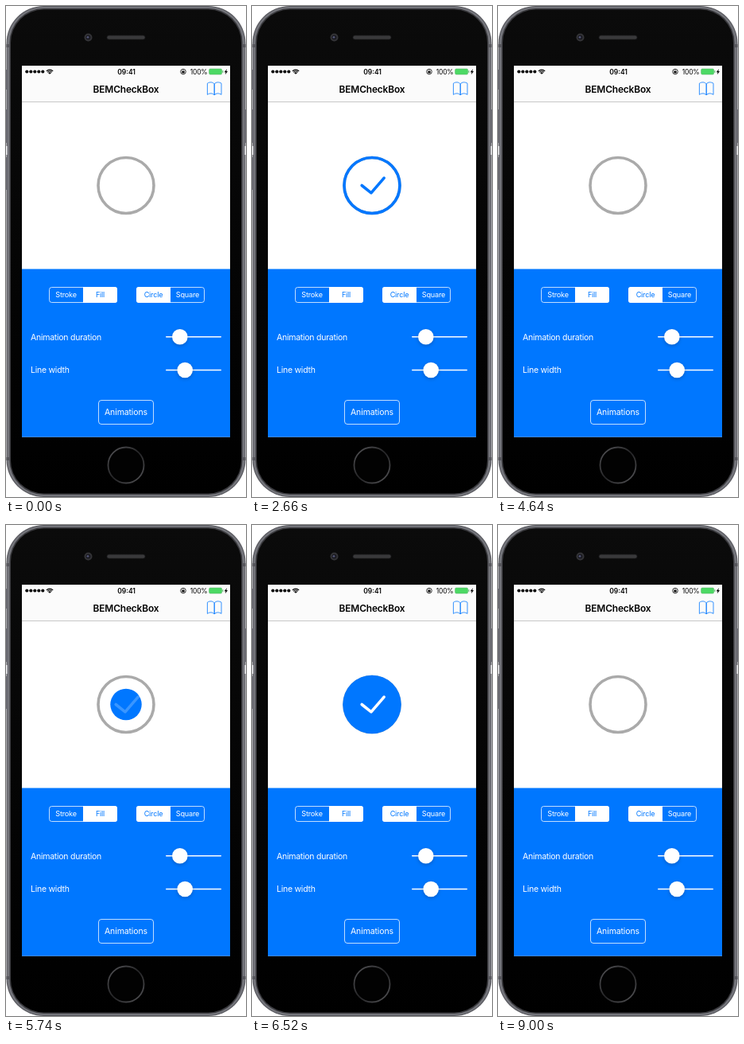
These frames come from a looping animation (302 px wide and 617 px high, 9.42 s). An HTML page with a canvas:

```html
<!DOCTYPE html>
<html lang="en">
<head>
<meta charset="utf-8">
<title>Checkbox demo</title>
<style>
html, body { margin: 0; width: 100%; height: 100%; overflow: hidden; background: #fff; }
canvas { display: block; width: 302px; height: 617px; }
</style>
</head>
<body>
<canvas id="stage"></canvas>
<script>
const W = 302, H = 617, LOOP = 9420, DURATION = 500;
const BLUE = '#0077ff', GREY = '#aaa', WHITE = '#fff';
const START = { strokeOn: 370, strokeOff: 3005, fillOn: 5576, fillOff: 8262 };
const BOX = { x: 151, y: 225.5, size: 70, line: 3.6 };
const SCREEN = { x: 20, y: 75, w: 262, h: 466.6 };

const canvas = document.getElementById('stage');
const ratio = window.devicePixelRatio || 1;
canvas.width = W * ratio;
canvas.height = H * ratio;
const screenCtx = canvas.getContext('2d');
let ctx = screenCtx;

function paint(fill, stroke, width = 1) {
  if (fill) { ctx.fillStyle = fill; ctx.fill(); }
  if (stroke) { ctx.strokeStyle = stroke; ctx.lineWidth = width; ctx.stroke(); }
}
function rect(x, y, w, h, fill) {
  ctx.fillStyle = fill;
  ctx.fillRect(x, y, w, h);
}
function round(x, y, w, h, r, fill, stroke, width) {
  ctx.beginPath();
  ctx.roundRect(x, y, w, h, r);
  paint(fill, stroke, width);
}
function disc(x, y, r, fill, stroke, width) {
  ctx.beginPath();
  ctx.arc(x, y, r, 0, Math.PI * 2);
  paint(fill, stroke, width);
}
function text(str, x, y, size, color, align = 'center', weight = 400, spacing = -0.02) {
  ctx.font = `${weight} ${size}px Inter, "Liberation Sans", sans-serif`;
  ctx.letterSpacing = `${size * spacing}px`;
  ctx.textAlign = align;
  ctx.fillStyle = color;
  ctx.fillText(str, x, y);
}
function gradient(x0, y0, x1, y1, ...colors) {
  const g = ctx.createLinearGradient(x0, y0, x1, y1);
  colors.forEach((c, i) => g.addColorStop(i / (colors.length - 1), c));
  return g;
}

function drawPhone() {
  rect(0, 0, W, H, WHITE);
  round(0.5, 0, 301, 617, 47, '#56565c');
  round(1.5, 1, 299, 615, 46, '#74757b');
  round(4.5, 3, 293, 611, 43, '#3a3a3e');
  round(6, 4.5, 290, 608, 41.5, gradient(0, 0, 0, H, '#0b0b0b', '#050505', '#000'));
  for (const y of [48, 567]) {
    rect(0.5, y, 4, 4, '#56565c');
    rect(297.5, y, 4, 4, '#56565c');
  }
  for (const x of [0, 300.5]) {
    rect(x, 130, 1.5, 42, '#6a6a72');
    rect(x, 176, 1.5, 11, '#f2f2f4');
  }
  rect(0, 80, 1.5, 25, '#6a6a72');
  rect(0, 190, 1.5, 41, '#6a6a72');
  disc(103.5, 39.5, 5, '#343437');
  disc(103.5, 39.5, 3, '#1b1b22');
  disc(103, 39.2, 1.3, '#55587a');
  round(127, 37, 48, 5, 2.5, '#39393b', '#1c1c1d', 0.8);
  disc(151, 577, 22.5, '#020202', gradient(130, 555, 172, 599, '#555558', '#242426', '#555558'), 1.8);
}

function drawStatusBar() {
  for (let i = 0; i < 5; i++) disc(26.3 + i * 5, 82.5, 2.05, '#000');
  ctx.lineCap = 'butt';
  for (const r of [2.3, 4.5, 6.6]) {
    ctx.beginPath();
    ctx.arc(55, 86, r - 0.7, -Math.PI * 0.75, -Math.PI * 0.25);
    paint(null, '#000', r < 3 ? 2 : 1.2);
  }
  text('09:41', 151.5, 85.6, 8.5, '#000', 'center', 600, 0);
  disc(223, 82.5, 3.3, null, '#000', 0.8);
  rect(221.4, 82, 3.2, 2.4, '#000');
  disc(223, 81.8, 1.1, null, '#000', 0.6);
  text('100%', 253.5, 85.6, 8.5, '#000', 'right');
  round(255.6, 79, 16, 7, 1.4, '#4cd964', '#58b868', 0.6);
  rect(272.3, 81.2, 1.1, 2.6, '#58b868');
  ctx.beginPath();
  [[278, 79], [274.7, 83.2], [276.5, 83.2], [275.8, 86.3], [279, 81.9], [277.2, 81.9]]
    .forEach(p => ctx.lineTo(...p));
  paint('#000');
}

function drawBook() {
  ctx.lineJoin = 'round';
  for (const side of [-1, 1]) {
    const x = d => 262.2 + side * d;
    ctx.beginPath();
    ctx.moveTo(x(0), 98);
    ctx.bezierCurveTo(x(2), 95.3, x(6), 95.3, x(8.8), 97.2);
    ctx.lineTo(x(8.8), 111.4);
    ctx.bezierCurveTo(x(6), 109.3, x(2), 109.3, x(0), 112);
    ctx.closePath();
    paint(null, BLUE, 0.8);
  }
}

function drawSegments(x, labels, selected) {
  const y = 353, w = 86, h = 20, half = w / 2;
  round(x + 0.5, y + 0.5, w - 1, h - 1, 3, null, WHITE, 0.75);
  const corners = selected ? [0, 3, 3, 0] : [3, 0, 0, 3];
  round(x + selected * half, y, half, h, corners, WHITE);
  labels.forEach((label, i) =>
    text(label, x + half * (i + 0.5), 366.3, 9.1, i === selected ? BLUE : WHITE));
}

function drawSlider(label, y, knob) {
  text(label, 31, y + 3.8, 10.5, WHITE, 'left', 400, -0.024);
  round(201, y - 0.7, 70, 1.4, 0.7, WHITE);
  ctx.save();
  ctx.shadowColor = 'rgba(0,0,0,.22)';
  ctx.shadowBlur = 4 * ratio;
  ctx.shadowOffsetY = 1.5 * ratio;
  disc(knob, y, 9.8, WHITE);
  ctx.restore();
}

function drawScene() {
  const { x, y, w, h } = SCREEN;
  drawPhone();
  rect(x, y, w, h, WHITE);
  rect(x, y, w, 45, '#fbfbfb');
  rect(x, 120, w, 0.8, '#b9b9bb');
  drawStatusBar();
  text('BEMCheckBox', 151, 108.5, 11.9, '#000', 'center', 600, -0.012);
  drawBook();
  rect(x, 330.5, w, y + h - 330.5, BLUE);
  drawSegments(54, ['Stroke', 'Fill'], 1);
  drawSegments(164, ['Circle', 'Square'], 0);
  drawSlider('Animation duration', 415.7, 218.8);
  drawSlider('Line width', 457.5, 225.2);
  round(116.5, 495.5, 69, 30, 3.5, null, WHITE, 0.75);
  text('Animations', 151, 514.3, 10.5, WHITE, 'center', 400, -0.01);
}

// Cubic ease-in-ease-out, control points (.42, 0) and (.58, 1).
function ease(p) {
  if (p <= 0) return 0;
  if (p >= 1) return 1;
  let lo = 0, hi = 1, u = 0.5;
  for (let i = 0; i < 20; i++) {
    u = (lo + hi) / 2;
    const x = 3 * u * (1 - u) * (0.42 * (1 - u) + 0.58 * u) + u ** 3;
    if (x < p) lo = u; else hi = u;
  }
  return u * u * (3 - 2 * u);
}
const progress = (t, start) => ease((t - start) / DURATION);

// Two-leg scale that overshoots to 1.18 at the midpoint.
function bounce(e, from, to) {
  const peak = 1.18;
  return e < 0.5 ? from + (peak - from) * e * 2 : peak + (to - peak) * (e * 2 - 1);
}

function drawCheck(color, end) {
  const { x, y, size, line } = BOX;
  const at = (a, b) => [x + size * (1 / a - 0.5), y + size * (1 / b - 0.5)];
  const pts = [at(3.1578, 2), at(2.0618, 1.57894), at(1.3953, 2.7272)];
  const gap = (a, b) => Math.hypot(b[0] - a[0], b[1] - a[1]);
  let left = end * (gap(pts[0], pts[1]) + gap(pts[1], pts[2]));
  ctx.lineCap = ctx.lineJoin = 'round';
  ctx.beginPath();
  ctx.moveTo(...pts[0]);
  for (let i = 0; i < 2 && left > 0; i++) {
    const [a, b] = [pts[i], pts[i + 1]];
    const k = Math.min(1, left / gap(a, b));
    ctx.lineTo(a[0] + (b[0] - a[0]) * k, a[1] + (b[1] - a[1]) * k);
    left -= gap(a, b);
  }
  paint(null, color, line);
}

function drawStroked(end) {
  if (end <= 0) return;
  ctx.save();
  ctx.translate(BOX.x, BOX.y);
  ctx.rotate(-Math.PI / 4);
  ctx.lineCap = 'round';
  ctx.beginPath();
  ctx.arc(0, 0, BOX.size / 2, 0, Math.PI * 2 * end);
  paint(null, BLUE, BOX.line);
  ctx.restore();
  drawCheck(BLUE, end);
}

function drawFilled(scale, opacity) {
  if (scale <= 0.001) return;
  disc(BOX.x, BOX.y, (BOX.size + BOX.line) / 2 * scale, BLUE);
  ctx.globalAlpha = opacity;
  drawCheck(WHITE, 1);
  ctx.globalAlpha = 1;
}

function drawCheckBox(t) {
  disc(BOX.x, BOX.y, BOX.size / 2, null, GREY, BOX.line);
  if (t < START.strokeOff) {
    drawStroked(progress(t, START.strokeOn));
  } else if (t < START.fillOn) {
    drawStroked(1 - progress(t, START.strokeOff));
  } else if (t < START.fillOff) {
    const e = progress(t, START.fillOn);
    drawFilled(bounce(e, 0, 1), e);
  } else {
    const e = progress(t, START.fillOff);
    drawFilled(bounce(e, 1, 0), 1 - e);
  }
}

// The surroundings never change, so they are painted once.
const backdrop = document.createElement('canvas');
backdrop.width = canvas.width;
backdrop.height = canvas.height;
ctx = backdrop.getContext('2d');
ctx.scale(ratio, ratio);
drawScene();
ctx = screenCtx;
ctx.scale(ratio, ratio);

const began = performance.now();
function frame() {
  ctx.drawImage(backdrop, 0, 0, W, H);
  drawCheckBox((performance.now() - began) % LOOP);
  requestAnimationFrame(frame);
}
frame();
</script>
</body>
</html>
```
